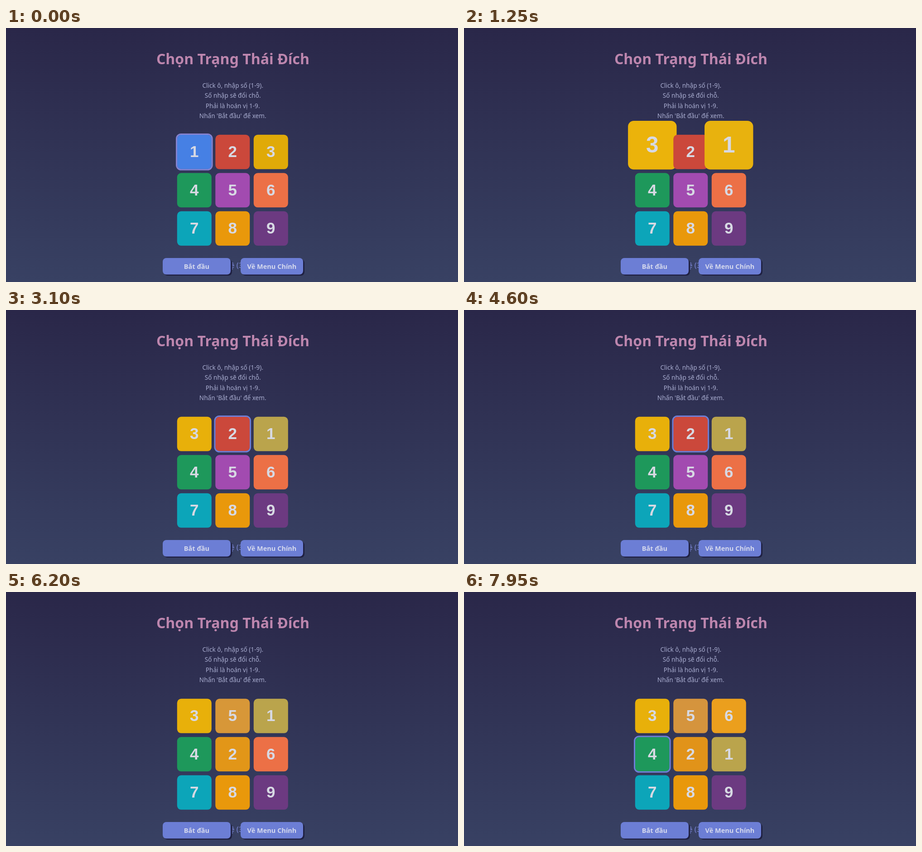
An HTML page with a canvas for the animation above (8 s loop, 998x561 px).

```html
<!DOCTYPE html>
<html lang="vi">
<head>
<meta charset="utf-8">
<style>
  html, body { margin: 0; width: 100%; height: 100%; overflow: hidden; background: #2a2849; }
  canvas { display: block; }
</style>
</head>
<body>
<canvas id="stage" width="998" height="561"></canvas>
<script>
const ctx = document.getElementById('stage').getContext('2d');
const LOOP = 8000, STEP = 50;
const SIZE = 76, PITCH = 84.5, LEFT = 415.8, TOP = 273.8;
const YELLOW = [235, 179, 11];
const COLORS = [
  [70, 128, 228], [203, 72, 59], [224, 170, 8],
  [30, 152, 91], [162, 75, 176], [236, 112, 70],
  [12, 165, 185], [233, 152, 11], [108, 58, 129]
];
const SWAPS = [
  { at: 1221, cells: [0, 2] },
  { at: 5698.7, cells: [1, 4] },
  { at: 7101, cells: [2, 5] }
];
const PICKS = [
  { from: 0, to: 1221, cell: 0 },
  { from: 2150, to: 5698.7, cell: 1 },
  { from: 6350, to: 7101, cell: 2 },
  { from: 7950, to: LOOP, cell: 3 }
];
const HINTS = [
  'Click ô, nhập số (1-9).',
  'Số nhập sẽ đổi chỗ.',
  'Phải là hoán vị 1-9.',
  "Nhấn 'Bắt đầu' để xem."
];
const SANS = '"Noto Sans", "Open Sans", sans-serif';
const DIGITS = '"Liberation Sans", Arial, sans-serif';

const mix = (a, b, k) => a.map((v, i) => v + (b[i] - v) * k);
const rgb = c => `rgb(${c.map(Math.round).join(',')})`;

function box(x, y, w, h, r, color) {
  ctx.beginPath();
  ctx.roundRect(x, y, w, h, r);
  ctx.fillStyle = color;
  ctx.fill();
}

function label(text, x, y, font, color, align = 'center') {
  ctx.font = font;
  ctx.fillStyle = color;
  ctx.textAlign = align;
  ctx.fillText(text, x, y);
}

// Quick pop, then a soft settle
function pop(age) {
  const rise = 60, end = 500;
  if (age < rise) return 0.6 * Math.sin(age / rise * Math.PI / 2);
  if (age > end) return 0;
  return 0.3 * (1 + Math.cos((age - rise) / (end - rise) * Math.PI));
}

function gridAt(t) {
  const cells = COLORS.map((_, i) => ({ n: i, age: Infinity, tint: 0 }));
  for (const { at, cells: [a, b] } of SWAPS) {
    if (t < at) break;
    [cells[a].n, cells[b].n] = [cells[b].n, cells[a].n];
    for (const i of [a, b]) {
      cells[i].age = t - at;
      cells[i].tint = 1 - 0.3 * Math.min(1, (t - at) / 550);
    }
  }
  // A tinted tile carries its tint to its new cell, so both ends match
  return cells;
}

function drawTile(cell, i, t) {
  const grow = pop(cell.age), s = SIZE * (1 + grow);
  const x = LEFT + i % 3 * PITCH;
  const y = TOP + Math.floor(i / 3) * PITCH - 36.5 * grow;
  box(x - s / 2, y - s / 2, s, s, 9 * (1 + grow), rgb(mix(COLORS[cell.n], YELLOW, cell.tint)));

  const pick = PICKS.find(p => p.cell === i && t >= p.from && t < p.to);
  if (pick) {
    const k = i ? 1 : Math.min(1, t / 700);
    ctx.beginPath();
    ctx.roundRect(x - 39.3, y - 39.3, 78.6, 78.6, 10);
    ctx.lineWidth = 3;
    ctx.strokeStyle = rgb(mix([132, 130, 208], [110, 127, 215], k));
    ctx.stroke();
  }
  const font = 35 * (1 + grow);
  label(cell.n + 1, x, y - 1.2 + font * 0.355, `bold ${font}px ${DIGITS}`, '#d7d9e3');
}

function button(x, w, text) {
  box(x + 3, 511, w, 36, 8, '#1f2042');
  box(x, 508, w, 36.5, 8, '#6c7ed5');
  label(text, x + w / 2, 532, `bold 14.5px ${SANS}`, '#d5d9ee');
}

function draw(t) {
  const sky = ctx.createLinearGradient(0, 0, 0, 561);
  sky.addColorStop(0, '#2a2749');
  sky.addColorStop(1, '#384163');
  ctx.fillStyle = sky;
  ctx.fillRect(0, 0, 998, 561);

  label('Chọn Trạng Thái Đích', 501, 79.5, `bold 32px ${SANS}`, '#bd86ae');
  HINTS.forEach((line, i) =>
    label(line, 500.7, 131.5 + i * 22.5, `13.6px ${SANS}`, '#a9add0'));
  gridAt(t).forEach((cell, i) => drawTile(cell, i, t));

  label('ệ (3', 495, 530, `bold 16px ${SANS}`, '#6973b8', 'left');
  button(346, 150, 'Bắt đầu');
  button(518, 138, 'Về Menu Chính');
}

const start = performance.now();
function tick() {
  const t = (performance.now() - start) % LOOP;
  draw(Math.floor(t / STEP) * STEP);
  requestAnimationFrame(tick);
}
tick();
</script>
</body>
</html>
```
